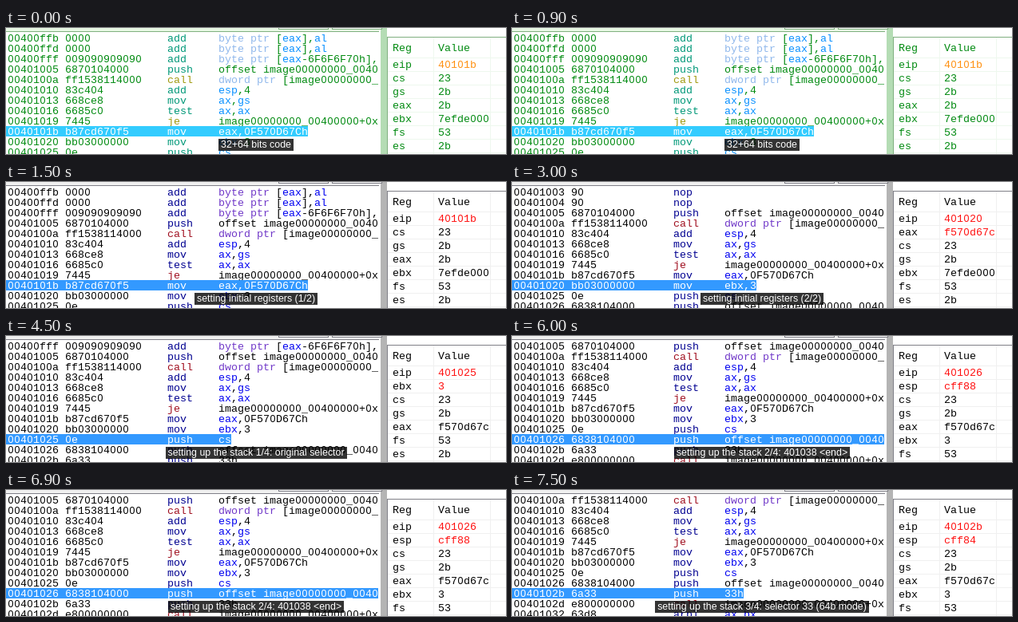
An HTML page with a canvas for the animation above (8000 ms loop, 626 by 158 pixels).

```html
<!DOCTYPE html>
<html lang="en">
<head>
<meta charset="utf-8">
<title>Debugger walkthrough</title>
<style>
html, body { margin: 0; width: 100%; height: 100%; overflow: hidden; background: #fff; }
canvas { display: block; }
</style>
</head>
<body>
<canvas id="stage" width="626" height="158"></canvas>
<script>
const ctx = document.getElementById('stage').getContext('2d');
const LOOP = 8000, STEP = 1500;
const CELL = 8, LINE = 13, TOP = 7, ROWS = 12, CURRENT = 9;
const OP_X = 202, ARG_X = 266;
const MONO = '13.333px "Liberation Mono", monospace';
const ZERO = '12.5px "Liberation Sans", sans-serif';
const CAPTION = '12.4px "Liberation Sans", sans-serif';

// address | bytes | mnemonic | operands
const code = `
00400ffb|0000|add|byte ptr [eax],al
00400ffd|0000|add|byte ptr [eax],al
00400fff|009090909090|add|byte ptr [eax-6F6F6F70h],
00401003|90|nop|
00401004|90|nop|
00401005|6870104000|push|offset image00000000_0040
0040100a|ff1538114000|call|dword ptr [image00000000_
00401010|83c404|add|esp,4
00401013|668ce8|mov|ax,gs
00401016|6685c0|test|ax,ax
00401019|7445|je|image00000000_00400000+0x
0040101b|b87cd670f5|mov|eax,0F570D67Ch
00401020|bb03000000|mov|ebx,3
00401025|0e|push|cs
00401026|6838104000|push|offset image00000000_0040
0040102b|6a33|push|33h
0040102d|e800000000|call|image00000000_00400000+0x
00401032|63d8|arpl|ax,bx`.trim().split('\n').map(row => row.split('|'));

const listing = code.filter(row => row[2] !== 'nop');

// Changed registers come first; "hot" counts how many of them are red.
const steps = [
  { from: 0, hot: 1, regs: 'eip 40101b cs 23 gs 2b eax 2b ebx 7efde000 fs 53 es 2b',
    note: '32+64 bits code' },
  { from: 0, hot: 1, regs: 'eip 40101b cs 23 gs 2b eax 2b ebx 7efde000 fs 53 es 2b',
    note: 'setting initial registers (1/2)' },
  { from: 3, nops: true, hot: 2, regs: 'eip 401020 eax f570d67c cs 23 gs 2b ebx 7efde000 fs 53 es 2b',
    note: 'setting initial registers (2/2)' },
  { from: 2, hot: 2, regs: 'eip 401025 ebx 3 cs 23 gs 2b eax f570d67c fs 53 es 2b',
    note: 'setting up the stack 1/4: original selector' },
  { from: 3, hot: 2, regs: 'eip 401026 esp cff88 cs 23 gs 2b eax f570d67c ebx 3 fs 53',
    note: 'setting up the stack 2/4: 401038 <end>' },
  { from: 4, hot: 2, regs: 'eip 40102b esp cff84 cs 23 gs 2b eax f570d67c ebx 3 fs 53',
    note: 'setting up the stack 3/4: selector 33 (64b mode)' }
];

const normal = { text: '#000', bar: '#3399ff', hot: '#ff1010', op: '#000090', jump: '#a01020',
  type: '#7038c8', reg: '#0000f0', edge: '#808088', band: '#b4b4b4', frame: '#f0f0f0', grid: '#f0f0f0' };
const green = { text: '#008a10', bar: '#33ccff', hot: '#ff9010', op: '#009878', jump: '#a09a10',
  type: '#90b8ec', reg: '#0890ff', edge: '#80b080', band: '#b4dcb4', frame: '#e8f8e4', grid: '#eef8ee' };

function rect(x, y, w, h, color) {
  ctx.fillStyle = color;
  ctx.fillRect(x, y, w, h);
}

// Text on a fixed character grid, with a plain zero.
function mono(text, x, y, color) {
  ctx.fillStyle = color;
  ctx.textAlign = 'center';
  [...text].forEach((ch, i) => {
    ctx.font = ch === '0' ? ZERO : MONO;
    ctx.fillText(ch, x + (i + 0.5) * CELL, y);
  });
}

function operands(text, x, y, look) {
  for (const part of text.match(/\w+|\W+/g) || []) {
    let color = look.text;
    if (/^(byte|dword|ptr)$/.test(part)) color = look.type;
    else if (/^(e?[a-d]x|al|esp|gs|cs)$/.test(part)) color = look.reg;
    mono(part, x, y, color);
    x += part.length * CELL;
  }
}

function disassembly(step, look) {
  const rows = (step.nops ? code : listing).slice(step.from, step.from + ROWS);
  rows.forEach(([address, bytes, op, args], i) => {
    const y = TOP + i * LINE, base = y + 10;
    const current = i === CURRENT;
    if (current) rect(0, y - 1, Math.min(ARG_X + args.length * CELL, 467), LINE, look.bar);
    mono(address + ' ' + bytes, 2, base, current ? '#fff' : look.text);
    if (current) {
      mono(op, OP_X, base, '#fff');
      mono(args, ARG_X, base, '#fff');
    } else {
      mono(op, OP_X, base, /call|je/.test(op) ? look.jump : look.op);
      operands(args, ARG_X, base, look);
    }
  });
}

function registers(step, look) {
  rect(467, 0, 159, 158, '#fff');
  rect(469, 0, 8, 158, look.band);
  rect(477, 11, 149, 1, look.edge);
  rect(477, 11, 1, 147, look.edge);
  for (let y = 37; y < 158; y += 17) rect(478, y, 148, 1, look.grid);
  rect(535, 12, 1, 146, look.grid);
  rect(606, 12, 1, 146, look.grid);
  mono('Reg', 484, 29, look.text);
  mono('Value', 541, 29, look.text);
  const words = step.regs.split(' ');
  for (let i = 0; i < words.length / 2; i++) {
    const y = 50 + i * 17;
    mono(words[2 * i], 484, y, look.text);
    mono(words[2 * i + 1], 541, y, i < step.hot ? look.hot : look.text);
  }
}

// Lower edge of the toolbar, with the bottoms of two buttons.
function toolbar(look) {
  rect(0, 0, 467, 4, look.frame);
  rect(0, 4, 467, 1, look.edge);
  for (const x of [341, 408]) {
    rect(x, 0, 63, 2, look.edge);
    rect(x + 1, 0, 61, 1, '#fff');
  }
}

function caption(text) {
  ctx.font = CAPTION;
  ctx.textAlign = 'center';
  const w = Math.round(ctx.measureText(text).width) + 6;
  rect(Math.round(313 - w / 2), 139, w, 15, 'rgba(0, 0, 0, 0.8)');
  ctx.fillStyle = '#fff';
  ctx.fillText(text, 313, 150);
}

function draw(now) {
  const index = Math.floor(now % LOOP / STEP);
  const step = steps[index], look = index ? normal : green;
  rect(0, 0, 626, 158, '#fff');
  disassembly(step, look);
  registers(step, look);
  toolbar(look);
  caption(step.note);
}

const start = performance.now();
function tick() {
  draw(performance.now() - start);
  requestAnimationFrame(tick);
}
tick();
</script>
</body>
</html>
```
